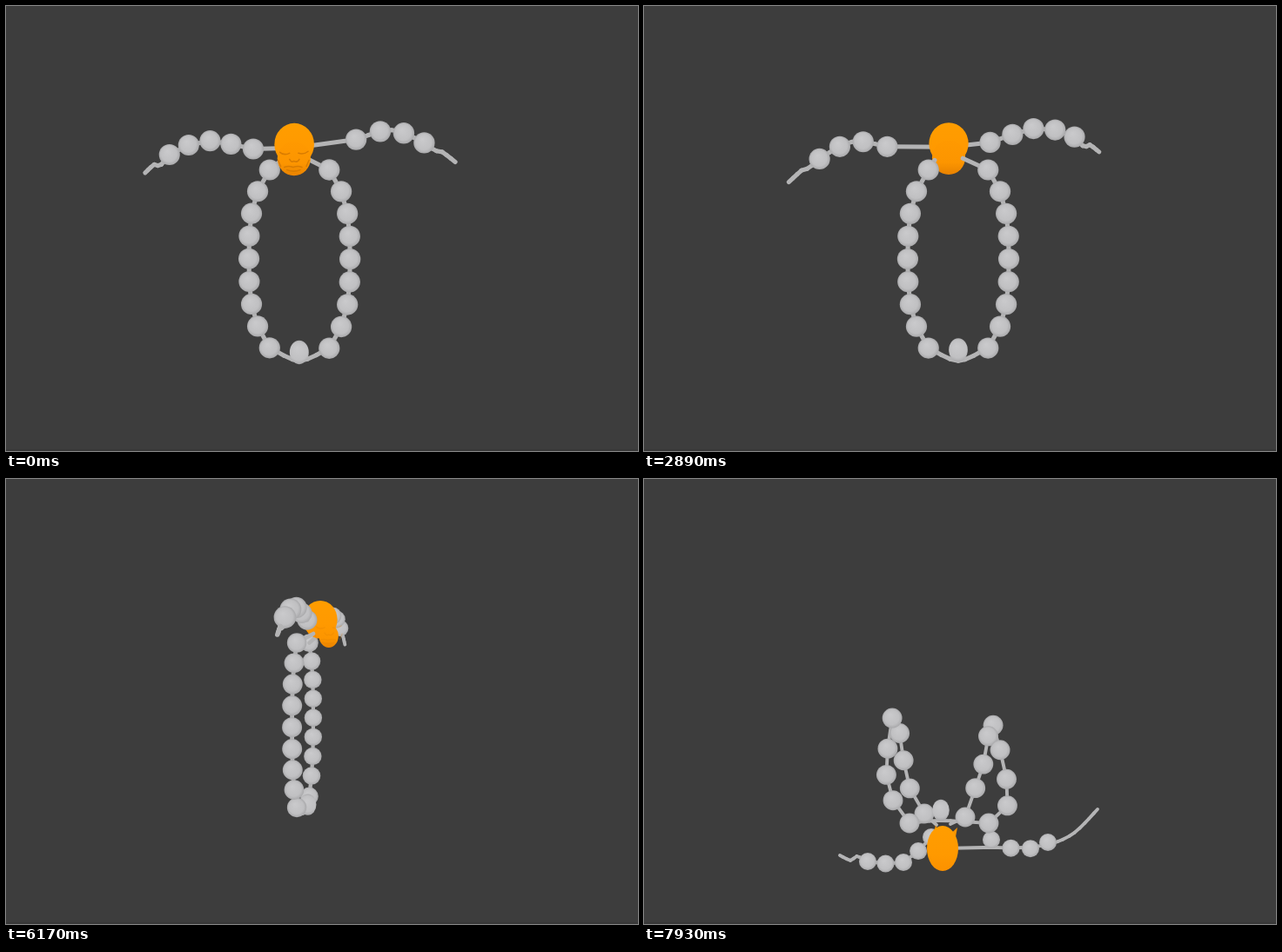
An HTML page with a canvas that plays this animation: 726x512 px, repeating every 8 s.

```html
<!DOCTYPE html>
<html lang="en">
<head>
<meta charset="utf-8">
<title>Bead necklace</title>
<style>
html, body { margin: 0; width: 100%; height: 100%; overflow: hidden; background: #3d3d3d; }
canvas { display: block; }
</style>
</head>
<body>
<canvas id="stage" width="726" height="512"></canvas>
<script>
const ctx = document.getElementById('stage').getContext('2d');
const LOOP = 8000, EYE_Y = 189, EYE_DISTANCE = 930, BEAD = 12;
const FALL_START = 6800, FALL_MID = 7370, FALL_END = 7930;

const clamp = v => Math.max(0, Math.min(1, v));
const mix = (a, b, u) => a + (b - a) * u;
const progress = (t, from, to) => clamp((t - from) / (to - from));
const smooth = (t, from, to) => {
  const u = progress(t, from, to);
  return u * u * (3 - 2 * u);
};

// Places count points at equal distances along a smooth curve through a few knots.
function along(knots, count) {
  const fine = [], steps = 24;
  const knot = i => knots[Math.max(0, Math.min(knots.length - 1, i))];
  for (let s = 0; s <= (knots.length - 1) * steps; s++) {
    const i = Math.floor(s / steps), u = s / steps - i;
    const [a, b, c, d] = [knot(i - 1), knot(i), knot(i + 1), knot(i + 2)];
    const axis = n => b[n] + u / 2 * (c[n] - a[n] +
      u * (2 * a[n] - 5 * b[n] + 4 * c[n] - d[n] + u * (3 * (b[n] - c[n]) + d[n] - a[n])));
    const x = axis(0), y = axis(1), last = fine[fine.length - 1];
    fine.push({ x, y, run: last ? last.run + Math.hypot(x - last.x, y - last.y) : 0 });
  }
  const length = fine[fine.length - 1].run;
  return Array.from({ length: count }, (_, i) => {
    const p = fine.find(f => f.run >= length * i / (count - 1) - .001);
    return [p.x, p.y];
  });
}

// Each node has a place in the turning model, then a tumbling and a landed place.
function chain(count, rest, tumble, landed, arm = false) {
  const mid = along(tumble, count), end = along(landed, count);
  return along(rest, count).map(([x, y], i) => ({ x, y, z: 0, mid: mid[i], end: end[i], arm }));
}
const single = (rest, mid, end, z, arm) => ({ x: rest[0], y: rest[1], z, mid, end, arm });

const head = single([-9, -30], [351, 279], [343, 425], 5, true);
const neck = { ...head, y: -26 };
const pendant = single([0, 206], [341, 393], [341, 381], 6, false);

const leftArm = chain(5, [[-56, -28], [-112, -41], [-152, -28]],
  [[326, 231], [292, 218], [254, 208]], [[330, 412], [298, 441], [257, 440]], true);
const leftTail = chain(9, [[-152, -28], [-163, -16], [-169, -18], [-180, -9]],
  [[254, 208], [242, 208], [236, 215], [223, 216]],
  [[257, 440], [244, 434], [238, 439], [225, 433]], true);
const rightArm = chain(4, [[61, -31], [101, -39], [138, -22]],
  [[402, 247], [459, 264]], [[399, 415], [432, 427], [464, 418]], true);
const rightCord = chain(20, [[61, -31], [101, -39], [138, -22], [150, -12], [156, -12], [173, 2]],
  [[394, 298], [430, 313], [470, 321], [475, 332], [485, 338]],
  [[390, 424], [450, 423], [490, 410], [521, 380]], true);

// Half of the hanging loop: nearly straight, drawn in towards both ends.
function hang(nodes, side) {
  nodes.forEach((node, i) => {
    const v = i / 4 - 1;
    node.x = side * 57.5 * (1 - .41 * Math.abs(v) ** 3);
    node.y = 101 + 104 * v - 2.5 * v ** 3;
  });
  return nodes;
}
const ends = [[0, 0], [0, 1]];
const leftLoop = hang(chain(9, ends,
  [[328, 247], [290, 256], [284, 330], [304, 407]],
  [[322, 385], [303, 349], [288, 268], [279, 350], [305, 396]]), -1);
const rightLoop = hang(chain(9, ends,
  [[371, 257], [392, 268], [400, 340], [402, 385], [383, 422]],
  [[369, 389], [393, 317], [398, 275], [419, 367], [396, 396]]), 1);
const loopBottom = chain(9, [[-34, 202], [0, 217], [34, 202]],
  [[304, 407], [341, 400], [383, 422]], [[305, 396], [341, 393], [396, 396]]);
const anchors = chain(2, [[-25, -12], [7, -12]], [[343, 266], [360, 268]], [[336, 398], [352, 397]], true);

const beads = [...leftArm, ...rightArm, ...leftLoop, ...rightLoop];
const armCords = [[neck, ...leftArm, ...leftTail], [neck, ...rightCord]];
const loopCord = [anchors[0], ...leftLoop, ...loopBottom, ...[...rightLoop].reverse(), anchors[1]];

function poseAt(t) {
  const turn = Math.PI * (smooth(t, -171, 2789) + smooth(t, 4300, 7700));
  const sin = Math.sin(turn), cos = Math.cos(turn);
  const zoomOut = smooth(t, 2900, 4970), late = progress(t, FALL_MID, FALL_END);
  return {
    turn, sin, cos,
    scale: mix(1.01, .9, zoomOut),
    armX: 341 - 18 * sin + 10 * zoomOut * (1 - smooth(t, 4970, 6170)),
    loopX: 349 - 12 * cos - 5 * sin * sin,
    tilt: .066 * (1 - zoomOut),
    tumble: progress(t, FALL_START, FALL_MID) ** 2,
    land: late * (1.4 - .4 * late),
  };
}

function project(node, pose) {
  const across = node.x * pose.cos - node.z * pose.sin;
  const depth = node.x * pose.sin + node.z * pose.cos;
  const k = pose.scale * EYE_DISTANCE / (EYE_DISTANCE - depth);
  const x = (node.arm ? pose.armX : pose.loopX) + across * k;
  const y = EYE_Y + (node.y - (node.arm ? pose.tilt * across : 0)) * k;
  const settle = (v, axis) => mix(mix(v, node.mid[axis], pose.tumble), node.end[axis], pose.land);
  return { x: settle(x, 0), y: settle(y, 1), depth, k };
}

function ellipse(x, y, rx, ry, fill) {
  ctx.fillStyle = fill;
  ctx.beginPath();
  ctx.ellipse(x, y, rx, ry, 0, 0, 7);
  ctx.fill();
}

function drawBead(x, y, rx, ry = rx) {
  const shade = ctx.createRadialGradient(x - rx * .2, y - ry * .35, 0, x, y, ry);
  shade.addColorStop(0, '#cacacc');
  shade.addColorStop(.75, '#c0c0c2');
  shade.addColorStop(1, '#a9a9ab');
  ellipse(x, y, rx, ry, shade);
}

function drawCord(a, b, pose) {
  ctx.strokeStyle = '#b4b4b5';
  ctx.lineWidth = mix(5, 4.3, pose.tumble) * (a.k + b.k) / 2;
  ctx.beginPath();
  ctx.moveTo(a.x, a.y);
  ctx.lineTo(b.x, b.y);
  ctx.stroke();
}

function drawFace(x, y, k, alpha) {
  ctx.save();
  ctx.translate(x, y);
  ctx.scale(k, k);
  ctx.globalAlpha = alpha;
  ctx.strokeStyle = '#d97c00';
  ctx.lineWidth = 1.5;
  ctx.stroke(new Path2D(
    'M-16 9q5 4 11 1M5 10q6 2 11-2M-5 17q2 4 5 2q4 2 6-2M-11 26q5-2 10 0q6-2 10 0M-8 29q8 3 15 0M-18 18l3 7M17 18l-3 7'));
  ctx.restore();
}

function drawSpike(x, y, tipX, tipY) {
  ctx.fillStyle = '#f79300';
  ctx.beginPath();
  ctx.moveTo(x - 5, y - 12);
  ctx.lineTo(tipX, tipY);
  ctx.lineTo(x + 5, y - 8);
  ctx.fill();
}

function verticalFade(y, ry, top, middle, bottom) {
  const fade = ctx.createLinearGradient(0, y - ry, 0, y + ry);
  [top, middle, bottom].forEach((color, i) => fade.addColorStop([0, .65, 1][i], color));
  return fade;
}

function drawHead({ x, y, k }, pose) {
  const { sin, cos, tumble, land } = pose, side = Math.abs(sin), whole = 1 - tumble;
  const size = (rest, mid, end) => mix(mix(rest * k, mid, tumble), end, land);
  const rx = size(22.5 - side, 14.5, 18), ry = size(24, 27, 26);
  if (tumble > 0) {
    drawSpike(x - 6, y, x + mix(-2, -8, land) * tumble, y - mix(47, 27, land) * tumble);
    drawSpike(x + 9, y, x + mix(13, 17, land) * tumble, y - mix(45, 24, land) * tumble);
  }
  ellipse(x, y, rx, ry, verticalFade(y, ry, '#ff9d00', '#ff9900', '#fb9100'));
  if (whole < .02) return;
  const jawK = k * whole, jawX = x - sin * 11 * jawK, jawY = y + (16 + 5 * side) * jawK;
  const jawH = (19.5 - 5 * side) * jawK;
  ellipse(jawX, jawY, (19 - 7 * side) * jawK, jawH, verticalFade(jawY, jawH, '#ff9900', '#fc9500', '#e88200'));
  if (cos > 0) drawFace(jawX, y, k, cos * whole);
}

function draw(t) {
  const pose = poseAt(t), items = [];
  const place = node => project(node, pose);
  const add = (depth, paint) => items.push({ depth, paint });
  const addCord = (cord, startsBehind) => {
    const points = cord.map(place);
    points.slice(1).forEach((b, i) => {
      const a = points[i];
      const depth = startsBehind && i === 0 ? -200 : (a.depth + b.depth) / 2 - 12;
      add(depth, () => drawCord(a, b, pose));
    });
  };

  armCords.forEach(cord => addCord(cord, true));
  addCord(loopCord, false);
  for (const bead of beads) {
    const p = place(bead);
    const change = bead.arm ? 1 - .15 * pose.tumble + .08 * pose.land : 1 + .06 * pose.land;
    add(p.depth, () => drawBead(p.x, p.y, BEAD * p.k * change));
  }
  const drop = place(pendant), skull = place(head);
  add(drop.depth, () => drawBead(drop.x, drop.y, 10.8 * drop.k, 13.5 * drop.k));
  add(18 * pose.cos, () => drawHead(skull, pose));

  ctx.fillStyle = '#3d3d3d';
  ctx.fillRect(0, 0, 726, 512);
  ctx.fillStyle = '#383838';
  ctx.fillRect(0, 510, 726, 2);
  ctx.lineCap = 'round';
  items.sort((a, b) => a.depth - b.depth).forEach(item => item.paint());
}

const start = performance.now();
function tick() {
  draw((performance.now() - start) % LOOP);
  requestAnimationFrame(tick);
}
tick();
</script>
</body>
</html>
```
